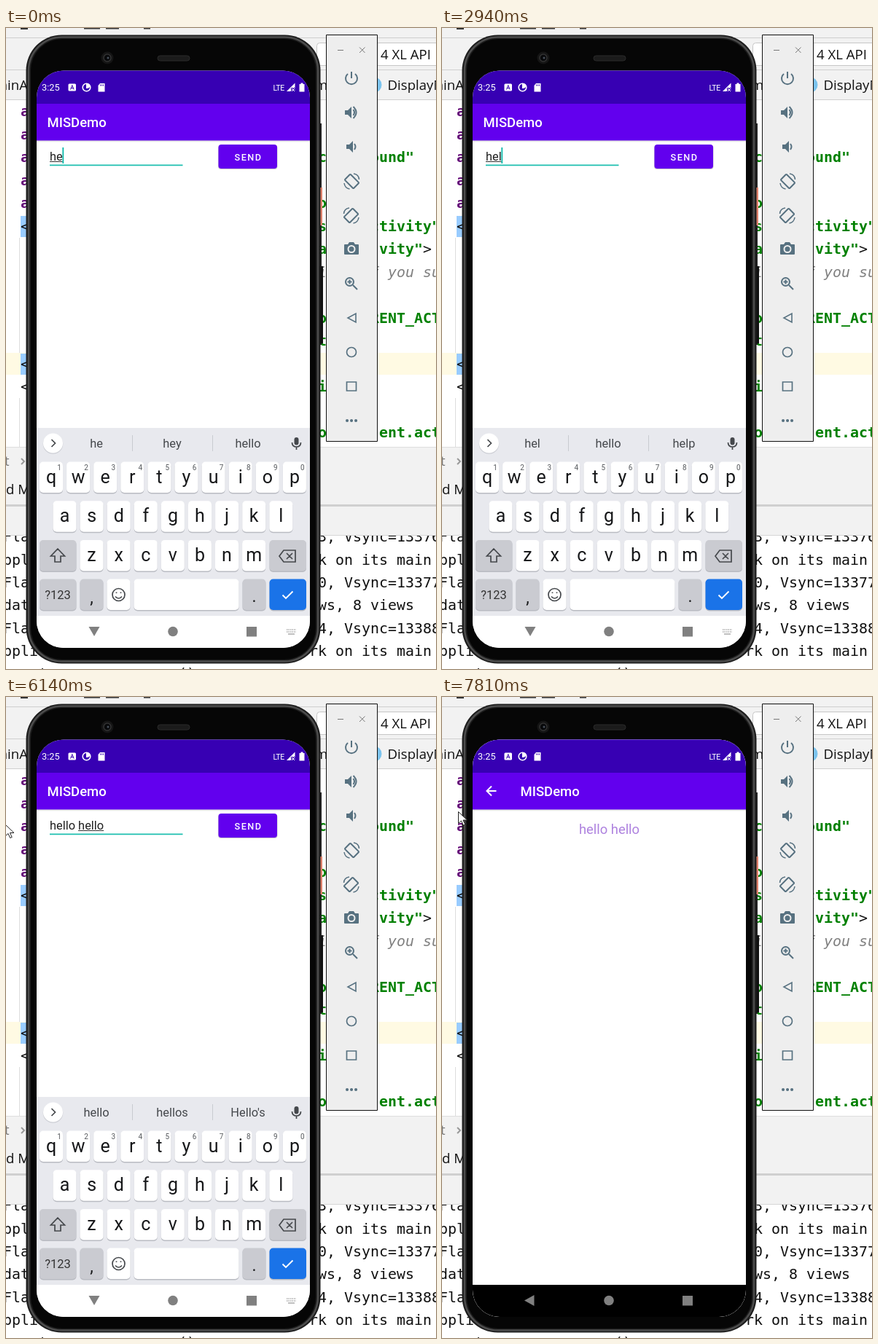
An HTML page that plays this animation: 590x880 px, repeating every 8 s.

```html
<!DOCTYPE html>
<html lang="en">
<head>
<meta charset="utf-8">
<title>Message demo</title>
<style>
  html, body { margin: 0; width: 100%; height: 100%; overflow: hidden; background: #fff; }
  svg { display: block; width: 590px; height: 880px; }
  text { white-space: pre; }
  .mono { font: 19.93px "DejaVu Sans Mono", monospace; fill: #111; }
  .str { font-weight: 700; fill: #008000; }
  .attr { font-weight: 700; fill: #660e7a; }
  .note { font-style: italic; fill: #808080; }
  .ui { font: 18.6px "Open Sans", sans-serif; fill: #111; }
  .app { font-family: Roboto, sans-serif; }
  .title { font-size: 18.5px; font-weight: 500; fill: #fff; }
  .key { font-size: 25px; fill: #17181a; text-anchor: middle; }
  .hint { font-size: 10px; fill: #55585c; text-anchor: middle; }
  .word { font-size: 16.4px; fill: #45484c; text-anchor: middle; }
  .field { font-size: 16.4px; fill: #212121; }
  .line { fill: none; stroke-width: 2; }
  #tools .line { stroke: #577180; }
  #tools .solid { fill: #577180; }
  #keys .line { stroke: #45484c; stroke-width: 1.7; }
</style>
</head>
<body>
<svg viewBox="0 0 590 880">
  <defs>
    <clipPath id="screenClip"><rect x="42" y="58.500" width="375" height="792.500" rx="37"/></clipPath>
    <clipPath id="buttonClip"><rect x="291.500" y="160" width="80.500" height="33" rx="4"/></clipPath>
    <clipPath id="consoleClip"><rect y="697" width="590" height="183"/></clipPath>
    <linearGradient id="shade" x2="0" y2="1">
      <stop stop-opacity=".16"/><stop offset="1" stop-opacity="0"/>
    </linearGradient>
    <g id="bars">
      <path d="M42 58h375v793H42z" fill="#fff"/>
      <path d="M42 58h375v46H42z" fill="#3700b3"/>
      <path d="M42 104h375v50.500H42z" fill="#6200ee"/>
      <path d="M42 154.500h375v2.500H42z" fill="url(#shade)"/>
    </g>
  </defs>

  <g id="editor"></g>

  <g id="phone">
    <path d="M430 131h3v304h-3z" fill="#222"/>
    <path d="M430 219h4v52h-4z" fill="#df826c"/>
    <path d="M430 327h5v106h-5z" fill="#111"/>
    <rect x="27.500" y="9.500" width="404" height="863" rx="49" fill="#1c1c1c"/>
    <rect x="31" y="12.500" width="397" height="857" rx="46" fill="none" stroke="#4c4c4c" stroke-width="2.500"/>
    <rect x="34" y="15" width="391" height="852" rx="43" fill="#060606"/>
    <circle cx="139" cy="41" r="8.500" fill="#151515"/>
    <circle cx="139" cy="41" r="5" fill="#08090b" stroke="#333" stroke-width="1.500"/>
    <circle cx="140" cy="41" r="1.500" fill="#48505a"/>
    <rect x="208" y="38" width="44" height="7" rx="3.500" fill="#1b1b1b" stroke="#2b2b2b"/>
  </g>

  <g class="app" clip-path="url(#screenClip)">
    <use href="#bars"/>
    <text class="title" x="56.500" y="136">MISDemo</text>
    <text class="field" id="typed" x="60" y="181.500"></text>
    <text class="field" id="prompt" x="60" y="181.500" style="fill:#9c9c9c">Enter a message</text>
    <path id="compose" stroke="#333" stroke-width="1.200"/>
    <path d="M60 187.500h182.500v1.700H60z" fill="#1dbfb0"/>
    <rect id="caret" y="164" width="1.800" height="22" fill="#0cb9aa"/>
    <rect id="lift" x="291" y="162" width="81.500" height="33" rx="4" opacity=".2"/>
    <rect x="291.500" y="160" width="80.500" height="33" rx="4" fill="#6200ee"/>
    <circle id="ripple" cx="332" cy="176.500" fill="#fff" clip-path="url(#buttonClip)"/>
    <text x="313.500" y="181.500" fill="#fff" font-size="12.700" font-weight="500" letter-spacing="1.500">SEND</text>

    <g id="page">
      <use href="#bars"/>
      <path class="line" d="M74.500 129H61.500m6.500-6.500-6.500 6.500 6.500 6.500" stroke="#fff" stroke-width="1.800"/>
      <text class="title" x="107.500" y="136">MISDemo</text>
      <text x="229.500" y="188" text-anchor="middle" font-size="18.400" fill="#ae82df">hello hello</text>
    </g>

    <g id="keys">
      <path d="M42 549h375v258H42z" fill="#e8e9ee"/>
      <circle cx="64.500" cy="571" r="13.800" fill="#ccced4"/>
      <circle cx="64.500" cy="570" r="13.500" fill="#fff"/>
      <path id="chevron" class="line"/>
      <g id="words">
        <path d="M173.500 559v22m110-22v22" stroke="#c9cbd0"/>
        <text class="word" x="124" y="576"></text>
        <text class="word" x="228" y="576"></text>
        <text class="word" x="332" y="576"></text>
      </g>
      <g id="strip">
        <path d="M310.500 560v20" stroke="#c9cbd0"/>
        <circle class="line" cx="112.500" cy="568" r="5"/><path class="line" d="m116 572 6 6"/>
        <path class="line" d="M163 563h11q2 0 2 2v6l-6 6h-7q-2 0-2-2v-10q0-2 2-2m13 8h-4q-2 0-2 2v4m-5-6q2 3 4 1m-5-4.500h2m4 0h2"/>
        <text x="222" y="574.500" text-anchor="middle" font-size="13" font-weight="900" letter-spacing=".6" fill="#45484c">GIF</text>
        <path class="line" d="M271 564h13v14h-13zm3 0v2h7v-2m-7 6h7m-7 4h5"/><circle cx="277.500" cy="563" r="2" fill="#45484c"/>
        <path d="M338 570h.1m5.900 0h.1m5.900 0h.1" stroke="#45484c" stroke-width="3.600" stroke-linecap="round"/>
      </g>
      <rect x="395.500" y="562" width="6" height="10.500" rx="3" fill="#45484c"/>
      <path class="line" d="M392.500 569q0 6 6 6t6-6m-6 6v4"/>
      <g id="keycaps"></g>
    </g>

    <g id="nav">
      <path id="navBack" d="M42 807h375v44H42z"/>
      <path id="back" fill="#808080"/>
      <circle cx="229" cy="828.500" r="6.800" fill="#808080"/>
      <path d="M330 822h14v13.500h-14z" fill="#808080"/>
      <g id="imeIcon" stroke="#aaa" stroke-width="1.500">
        <path d="M385 826h13m-13 3h13" stroke-dasharray="1.500 1"/><path d="M387 832h9"/>
      </g>
    </g>

    <g fill="#fff">
      <text x="49" y="86" font-size="12.800">3:25</text>
      <rect x="85.500" y="76.500" width="10.500" height="10" rx="1.500"/>
      <path d="m88.500 84.500 2.300-6 2.300 6m-4-2h3.500" fill="none" stroke="#3700b3"/>
      <circle cx="110.500" cy="81.500" r="5.300" fill="none" stroke="#fff" stroke-width="1.600"/>
      <path d="M110 76h2q3 1 3 4t-5 3z"/>
      <path d="M129 76h6.500v11.500H126.500V79z"/>
      <path d="M129.500 77.500v2m2-2v2m2-2v2" stroke="#3700b3"/>
      <text x="366.500" y="85.500" font-size="10.500" letter-spacing="-.4">LTE</text>
      <path d="M396.500 75.500V87H385z"/>
      <path d="m391.500 82.500 5 5m0-5-5 5" stroke="#3700b3" stroke-width="3"/>
      <path d="m392 83 4 4m0-4-4 4" stroke="#fff"/>
      <path d="M404.500 75.500h3v1.500h2v10.500h-7V77h2z"/>
    </g>
  </g>

  <g id="tools">
    <path d="M439.500 9.500h70v558h-70z" fill="#eee" stroke="#111"/>
    <path d="M455 30.500h8m22-4 7.500 7.500m0-7.500L485 34" stroke="#777" fill="none"/>
    <path class="line" d="M474 60v9m-5-6a8 8 0 1 0 10 0"/>
    <path class="solid" d="M465 113h4l5-5v16l-5-5h-4z"/>
    <path class="line" d="M476.500 112q3 4 0 8m0-12q8 8 0 16"/>
    <path class="solid" d="M467 160h4l5-5v16l-5-5h-4z"/><path class="line" d="M478 159q3 4 0 8"/>
    <g id="turn">
      <rect class="line" x="469" y="202" width="11" height="17" rx="1" transform="rotate(-45 474.500 210.500)"/>
      <path class="line" d="M477 200q7 1 7.500 8M464 213q1 7 7.500 8" style="stroke-width:1.500"/>
    </g>
    <use href="#turn" transform="translate(948 47) scale(-1 1)"/>
    <path class="solid" d="M465 297h4l2-3h6l2 3h4q1 0 1 1v12q0 1-1 1h-18q-1 0-1-1v-12q0-1 1-1"/>
    <circle cx="474" cy="303.500" r="4.500" fill="#577180" stroke="#eee" stroke-width="2"/>
    <circle class="line" cx="471.500" cy="348.500" r="5.500"/><path class="line" d="m476 353 6 6m-13.500-10.500h6m-3-3v6"/>
    <path class="line" d="M480 392v12l-11-6z" style="stroke-width:1.600"/>
    <circle class="line" cx="474" cy="445" r="6.500" style="stroke-width:1.700"/>
    <path class="line" d="M467.500 486h13v12h-13z" style="stroke-width:1.700"/>
    <path d="M468 539h.1m5.900 0h.1m5.900 0h.1" stroke="#577180" stroke-width="4" stroke-linecap="round"/>
  </g>
  <path id="mouse" d="M0 0v16l4-3.500 2.700 6 2.500-1-2.700-6H12z" fill="#fff" stroke="#222"/>
</svg>

<script>
const $ = id => document.getElementById(id);
const rect = (x, y, w, h, fill, more = '') =>
  `<rect x="${x}" y="${y}" width="${w}" height="${h}" fill="${fill}" ${more}/>`;
const label = (cls, x, y, text, more = '') =>
  `<text class="${cls}" x="${x}" y="${y}" ${more}>${text.replace(/</g, '&lt;')}</text>`;

// Editor behind the phone: text sits on a 12 px column grid.
function drawEditor() {
  const mono = (cls, x, y, text) => label('mono ' + cls, x, y + 7, text);
  const consoleRows = [
    [698, 'Fla', ' 3, Vsync=13376'], [730, 'ppli', 'rk on its main '],
    [761, 'Fla', ' 0, Vsync=13377'], [792, 'data', 'ews, 8 views'],
    [824, 'Fla', ' 4, Vsync=13388'], [855, 'ppli', 'rk on its main ']];
  const strings = [
    [177, 'c     ound"'], [240, 'o'], [272, 's     ctivity"'], [303, 'a      vity"'],
    [398, 'o     RENT_ACT'], [429, 't'], [492, 'i'], [555, 'o      ent.act']];
  $('editor').innerHTML =
    rect(0, 0, 590, 98, '#f2f2f2') + rect(0, 13, 590, 1, '#cfcfcf') +
    rect(20, 0, 10, 2, '#333') + rect(107, 0, 22, 1.5, '#333') + rect(137, 0, 18, 1.5, '#333') + rect(189, 0, 9, 1.5, '#333') +
    rect(426.5, 20.5, 180, 31, '#fff', 'rx="4" stroke="#c6c6c6"') +
    label('ui', 514, 43, '4 XL API') +
    rect(0, 57, 590, 1, '#cfcfcf') + rect(0, 98, 590, 1, '#cfcfcf') +
    label('ui', 30, 85, 'MainA', 'text-anchor="end"') + label('ui', 424, 85, 'm') +
    '<circle cx="505" cy="78" r="10.500" fill="#7cc4ee"/>' + label('ui', 523.5, 85, 'DisplayM') +
    rect(0, 446, 590, 30, '#fffae3') +
    rect(18, 288, 1, 158, '#ddd') + rect(18, 508, 1, 67, '#ddd') +
    rect(20, 258, 12, 29, '#99ccff') + rect(20, 447, 12, 29, '#99ccff') +
    [114, 146, 177, 209, 240].map(y => mono('attr', 20, y, 'a')).join('') +
    [272, 461, 492].map(y => mono('', 20, y, '<')).join('') +
    strings.map(([y, s]) => mono('str', 428, y, s)).join('') +
    mono('', 572, 303, '>') + mono('note', 428, 335, 'i     f you su') +
    rect(0, 575, 590, 122, '#f2f2f2') + rect(0, 575, 590, 1, '#dedede') +
    label('ui', -2, 601, 't', 'style="fill:#777"') +
    '<path class="line" d="m21 591 4 4-4 4" stroke="#999" stroke-width="1"/>' +
    label('ui', 33, 640, 'd M', 'text-anchor="end"') +
    rect(0, 654, 590, 3, '#d0d0d0') +
    rect(0, 696, 590, 184, '#fff') + rect(0, 696, 590, 1, '#d5d5d5') +
    '<g clip-path="url(#consoleClip)">' +
    consoleRows.map(([y, a, b]) => mono('', -4, y, a) + mono('', 416, y, b)).join('') +
    mono('', 44, 886, "'") + mono('', 236, 886, '()') + '</g>';
}

function drawKeys() {
  const pitch = 37.1, grey = '#cacbd1', white = '#fff';
  const cap = (x, y, w, fill = white) =>
    rect(x, y + 1, w, 43, '#b9bbc2', 'rx="5"') + rect(x, y, w, 42.5, fill, 'rx="5"');
  let out = '';
  [['qwertyuiop', 62], ['asdfghjkl', 80.5], ['zxcvbnm', 117.5]].forEach(([row, start], r) => {
    [...row].forEach((c, i) => {
      const x = start + i * pitch, y = 595.5 + r * 53.7;
      out += cap(x - 16, y, 32) + label('key', x, y + 29, c);
      if (!r) out += label('hint', x + 11, y + 11, String((i + 1) % 10));
    });
  });
  out += cap(46, 703, 50.5, grey) + cap(361.5, 703, 50.5, grey) +
    cap(46, 756.5, 50.5, grey) + cap(101.5, 756.5, 32, grey) + cap(138.5, 756.5, 32) +
    cap(175.5, 756.5, 144) + cap(324.5, 756.5, 32, grey) + cap(361.5, 756.5, 50.5, '#1a73e8') +
    label('key', 71, 784, '?123', 'style="font-size:16.5px;fill:#333"') +
    label('key', 117.5, 790, ',', 'style="font-size:23px"') + label('key', 340.5, 788, '.', 'style="font-size:23px"') +
    '<path class="line" d="m71 715 9.500 10H75v8h-8v-8h-5.500zM375 725l6-8h16v16h-16zm10-4 8 8m0-8-8 8"/>' +
    '<circle class="line" cx="154.500" cy="778" r="8.500"/><path class="line" d="M150 780.500q4.500 5 9 0m-7.500-6v1.500m6-1.500v1.500"/>' +
    '<path d="m379.500 778.500 4.500 4.500 9.500-9.500" fill="none" stroke="#fff" stroke-width="1.900"/>';
  $('keycaps').innerHTML = out;
}

// [time, text, suggestions]
const idle = 'world I my', he = 'he hey hello', full = "hello hellos Hello's";
const steps = [
  [0, 'he', he], [170, 'h', 'h he have'], [370, '', ''],
  [2140, 'h', 'h he have'], [2300, 'he', he], [2940, 'hel', 'hel hello help'],
  [3040, 'hell', 'hell hello hells'], [3140, 'hello', 'hell hello hells'], [3340, 'hello', full],
  [4040, 'hello ', idle], [4470, 'hello h', idle], [4640, 'hello he', he],
  [4900, 'hello hel', 'hel hello help'], [5170, 'hello hell', 'hell hello hells'],
  [5410, 'hello hello', 'hell hello hells'], [5640, 'hello hello', full]];
const path = [[6140, -1, 175], [6270, 5, 193], [6440, 15, 165], [6540, 21, 153], [6640, 22.5, 157.5]];

const clamp = v => Math.max(0, Math.min(1, v));
const span = (t, from, length) => clamp((t - from) / length);
const show = (id, on) => $(id).setAttribute('visibility', on ? 'visible' : 'hidden');
const set = (id, values) => { for (const k in values) $(id).setAttribute(k, values[k]); };

const pen = document.createElement('canvas').getContext('2d');
function textWidth(text) {
  pen.font = '16.4px Roboto, sans-serif';
  return pen.measureText(text).width;
}

function drawTyping(t) {
  const [since, text, words] = steps.filter(s => s[0] <= t).pop();
  const end = 60 + textWidth(text), start = 60 + textWidth(text.slice(0, text.lastIndexOf(' ') + 1));
  $('typed').textContent = text;
  show('prompt', !text);
  set('compose', { d: `M${start} 183.500H${end}` });
  show('compose', end > start);
  set('caret', { x: text ? end - .3 : 60 });
  show('caret', t < 6140 && (t - since) % 1000 < 500);
  show('words', words);
  show('strip', !words);
  const slots = $('words').querySelectorAll('text');
  words.split(' ').forEach((w, i) => { slots[i].textContent = w; });
  set('chevron', { d: words ? 'm62.500 565 5 5-5 5' : 'm66.500 565-5 5 5 5' });
}

function drawMouse(t) {
  show('mouse', t >= path[0][0]);
  const next = path.findIndex(p => p[0] > t);
  const i = next < 0 ? path.length - 1 : Math.max(1, next);
  const a = path[i - 1], b = path[i], p = span(t, a[0], b[0] - a[0]);
  set('mouse', { transform: `translate(${a[1] + (b[1] - a[1]) * p} ${a[2] + (b[2] - a[2]) * p})` });
}

function drawPress(t) {
  const grow = span(t, 6840, 225);
  const fade = span(t, 6840, 75) * (1 - span(t, 7060, 150));
  set('ripple', { r: 12 + 32 * (1 - (1 - grow) ** 2), opacity: .24 * fade });
  set('lift', { y: 161 + fade });
}

function drawPage(t) {
  const ease = 1 - (1 - span(t, 7440, 370)) ** 4, size = .85 + .15 * ease;
  set('page', {
    opacity: span(t, 7475, 60),
    transform: `translate(229.500 454.500) scale(${size}) translate(-229.500 -454.500)`
  });
  const hide = span(t, 7475, 150);
  set('keys', { opacity: 1 - hide, transform: `translate(0 ${26 * hide * hide})` });
  const dark = t >= 7490;
  set('navBack', { fill: dark ? '#000' : '#fff' });
  set('back', { d: dark ? 'M126.500 821v15l-13.500-7.500z' : 'M113.500 822h15l-7.500 13z' });
  show('imeIcon', !dark);
}

drawEditor();
drawKeys();
let origin;
function tick(now) {
  origin ??= now;
  const t = (now - origin) % 8000;
  [drawTyping, drawMouse, drawPress, drawPage].forEach(draw => draw(t));
  requestAnimationFrame(tick);
}
requestAnimationFrame(tick);
</script>
</body>
</html>
```
